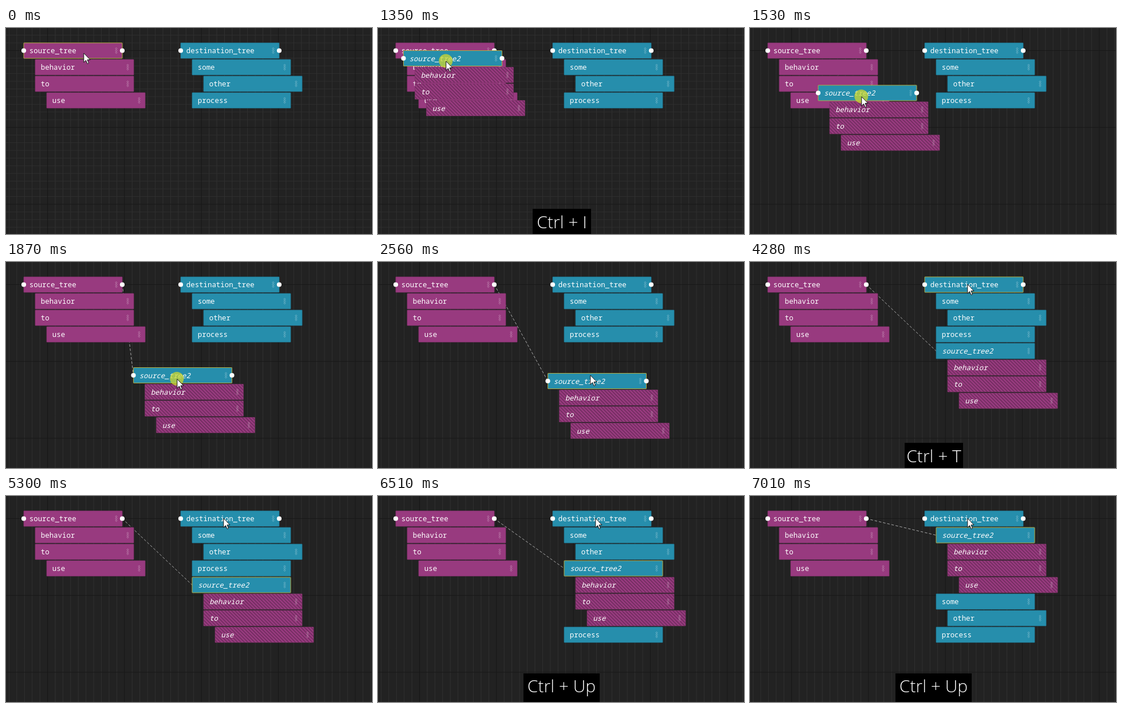
Write an HTML page that moves like this. It is 639 by 360 pixels and loops after 9350 ms.

```html
<!DOCTYPE html>
<html lang="en">
<head>
<meta charset="utf-8">
<title>Tree reference</title>
<style>
  html, body { margin: 0; width: 100%; height: 100%; overflow: hidden; background: #222; }
  svg { display: block; }
  .row { font: 500 12.4px "Noto Sans Mono", "DejaVu Sans Mono", monospace; fill: #fff; white-space: pre; }
  .ref { font-style: italic; }
  .keys { font: 300 30px "Open Sans", "Noto Sans", sans-serif; fill: #fff; text-anchor: middle; }
</style>
</head>
<body>
<svg width="639" height="360" viewBox="0 0 639 360">
  <defs>
    <pattern id="hatch" width="4.2" height="4.2" patternUnits="userSpaceOnUse" patternTransform="rotate(-45)">
      <rect width="4.2" height="4.2" fill="#983a7f"/>
      <rect width="1.3" height="4.2" fill="#672a57"/>
    </pattern>
  </defs>
  <rect width="639" height="360" fill="#222"/>
  <g id="grid" fill="none"></g>
  <g id="scene"></g>
</svg>
<script>
const LOOP = 9350, ROW = 29, INDENT = 20, CELL = 13.43;
const PURPLE = { fill: '#983a7f', edge: '#86336f' };
const TEAL = { fill: '#268eac', edge: '#1f7a95' };
const HATCH = { fill: 'url(#hatch)', edge: '#7f3169' };

const SOURCE = [['source_tree', 0], ['behavior', 1], ['to', 1], ['use', 2]];
const DEST = [['destination_tree', 0], ['some', 1], ['other', 2], ['process', 1]];
const REF = [['source_tree2', 0], ['behavior', 1], ['to', 1], ['use', 2]];

// Each step changes only the listed parts of the state.
// cur: pointer, at: free tree position, slot: row inside the destination tree
const steps = [
  [0, { cur: [136, 44], at: null, slot: 0, sel: ['source'], press: false, keys: '', rows: true }],
  [500, { keys: 'Ctrl + I' }],
  [850, { at: [44.5, 39.5], sel: ['source', 'ref'] }],
  [1020, { cur: [121, 45], sel: ['ref'] }],
  [1190, { cur: [119, 58] }],
  [1350, { press: true }],
  [1530, { cur: [195, 120], at: [119, 100], keys: '', rows: false }],
  [1700, { cur: [266, 178], at: [189, 158] }],
  [1870, { cur: [299, 204.5], at: [222.5, 184.5] }],
  [2050, { cur: [335, 214], at: [259, 194] }],
  [2210, { cur: [363, 216], at: [287, 196] }],
  [2380, { cur: [371, 216], at: [295, 196] }],
  [2560, { cur: [371, 198], at: [296.5, 194.5], press: false }],
  [2730, { cur: [371, 197] }],
  [2900, { cur: [373, 82] }],
  [3080, { cur: [375, 51] }],
  [3250, { cur: [380, 40] }],
  [3410, { cur: [380, 39], press: true, sel: ['ref', 'dest'] }],
  [3580, { press: false }],
  [4280, { slot: 4, sel: ['dest'], keys: 'Ctrl + T' }],
  [4440, { sel: ['ref'] }],
  [5300, { keys: '' }],
  [6510, { slot: 3, keys: 'Ctrl + Up' }],
  [7010, { slot: 1 }]
];

const states = [];
steps.forEach(([, change], i) => states.push({ ...states[i - 1], ...change }));

function gridPath(start, end, vertical, major, offset) {
  let d = '';
  for (let i = 0, p = start; p < end; p = start + CELL * ++i) {
    if ((i % 10 === offset) !== major) continue;
    const q = p.toFixed(2);
    d += vertical ? `M${q} 0V360` : `M0 ${q}H639`;
  }
  return d;
}

const grid = document.getElementById('grid');
grid.innerHTML =
  `<path id="across" stroke="#2e2e2e" d="${gridPath(12.5, 360, false, false, 2)}"/>
   <path stroke="#313131" d="${gridPath(5.4, 639, true, false, 5)}"/>
   <path stroke="#181818" d="${gridPath(12.5, 360, false, true, 2)}${gridPath(5.4, 639, true, true, 5)}"/>`;
const across = document.getElementById('across');
const scene = document.getElementById('scene');

function node(x, y, label, look, selected, ref) {
  let grip = '';
  for (const cy of [10, 13.5, 17]) grip += `M161.5 ${cy - 1.7}l1.7 1.7l-1.7 1.7l-1.7 -1.7z`;
  const [line, width] = selected ? ['#b3ab42', 1] : [look.edge, .7];
  return `<g transform="translate(${x} ${y})">` +
    `<rect width="172" height="27" rx=".6" fill="${look.fill}" stroke="${line}" stroke-width="${width}"/>` +
    `<path d="${grip}" fill="none" stroke="#fff" stroke-opacity=".38" stroke-width=".8"/>` +
    `<text class="row${ref ? ' ref' : ''}" x="${ref ? 10.2 : 9.8}" y="18">${label}</text></g>`;
}

function ports(x, y) {
  return [x, x + 172].map(cx => `<circle cx="${cx}" cy="${y + 13.5}" r="4.1" fill="#fff"/>`).join('');
}

function tree(rows, x, y, look, selected, slot = 9) {
  return rows.map(([label, depth], i) =>
    node(x + depth * INDENT, y + ROW * (i >= slot ? i + 4 : i), label, look, selected && !i)).join('') + ports(x, y);
}

function refTree(s, x, y) {
  const rows = REF.map(([label, depth], i) =>
    node(x + depth * INDENT, y + ROW * i, label, i ? HATCH : TEAL, !i && s.sel.includes('ref'), true)).join('');
  return rows + (s.slot ? '' : ports(x, y));
}

function pointer([x, y], press) {
  return `<g transform="translate(${x - .7} ${y - .5})">` +
    (press ? '<circle r="12" fill="#ccd630" fill-opacity=".76"/>' : '') +
    '<path d="M.5 .5V16.5L4.2 13L6.8 19L9.2 18L6.7 12.1H11.7Z" fill="#fff" stroke="#111"/></g>';
}

function keyBox(keys) {
  if (!keys) return '';
  const tall = keys.endsWith('p');
  const [x, y, w] = tall ? [254, 310, 133] : [270, 316, 102];
  return `<rect x="${x}" y="${y}" width="${w}" height="${360 - y}" fill="#000"/>` +
    `<text class="keys" x="${x + w / 2}" y="${tall ? 343 : 349.5}">${keys}</text>`;
}

function draw(s) {
  across.setAttribute('opacity', s.rows ? 1 : .12);
  const [x, y] = s.slot ? [325, 26 + ROW * s.slot] : s.at || [];
  let out = '';
  if (s.at) out += `<path d="M203 39.5L${x} ${y + 13.5}" stroke="#a8a8a8" stroke-dasharray="4.5 3"/>`;
  out += tree(SOURCE, 31, 26, PURPLE, s.sel.includes('source'));
  out += tree(DEST, 305, 26, TEAL, s.sel.includes('dest'), s.slot || 9);
  if (s.at) out += refTree(s, x, y);
  scene.innerHTML = out + pointer(s.cur, s.press) + keyBox(s.keys);
}

const began = performance.now();
let shown = -1;
function tick() {
  const t = (performance.now() - began) % LOOP;
  let i = steps.length - 1;
  while (steps[i][0] > t) i--;
  if (i !== shown) draw(states[shown = i]);
  requestAnimationFrame(tick);
}
tick();
</script>
</body>
</html>
```
